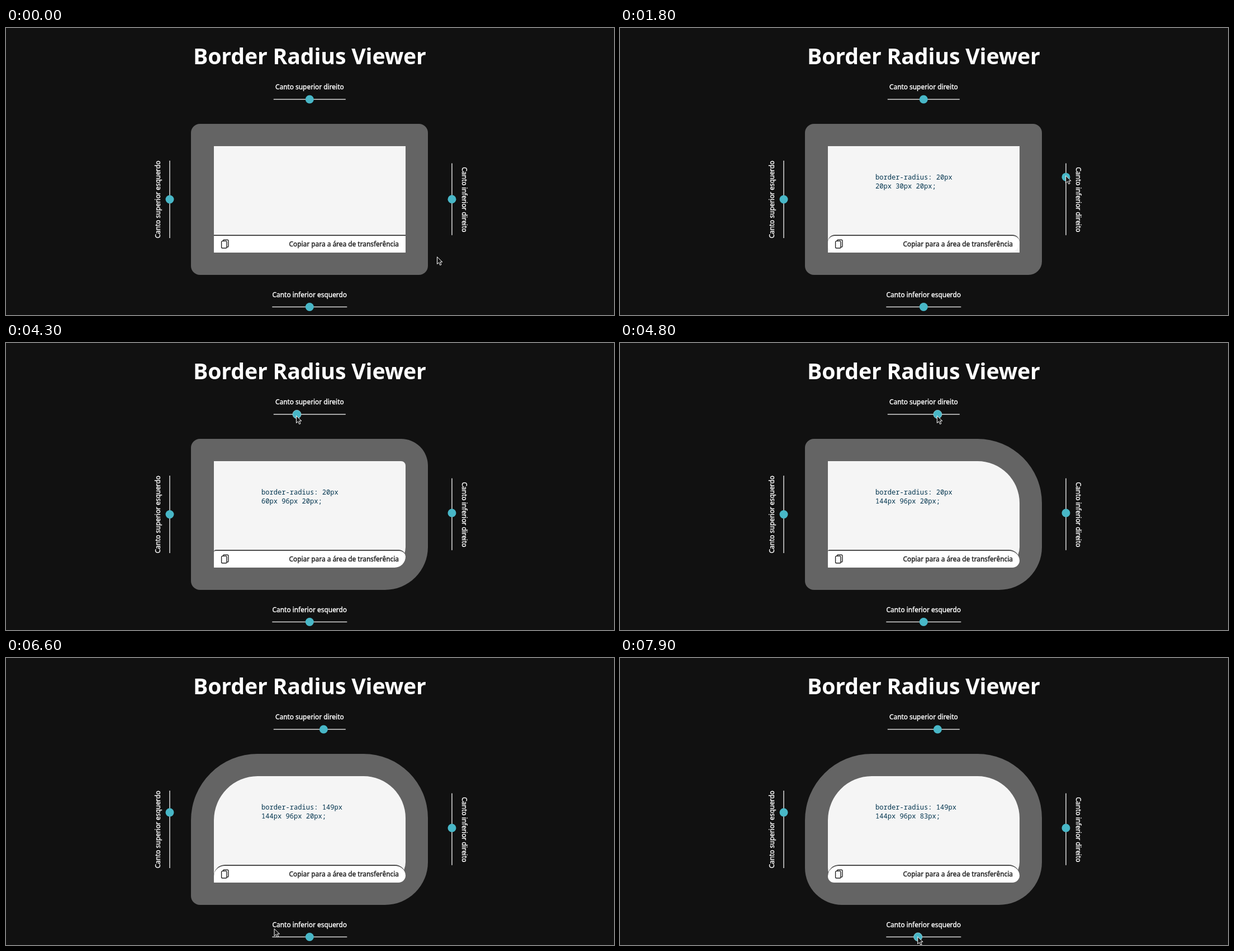
These frames come from a looping animation (1088 by 515 pixels, 8 s). An HTML page:

```html
<!DOCTYPE html>
<html lang="pt">
<head>
<meta charset="utf-8">
<title>Border Radius Viewer</title>
<style>
  html, body { margin: 0; width: 100%; height: 100%; overflow: hidden; background: #111; }
  #stage { position: relative; width: 1088px; height: 515px; overflow: hidden; }
  #box {
    position: absolute; left: 331px; top: 172px; width: 424px; height: 271px;
    box-sizing: border-box; border: 40px solid #646464; border-left-width: 41px;
    background: #f5f5f5;
  }
  #bar {
    position: absolute; left: 0; right: 0; bottom: 0; height: 32px;
    box-sizing: border-box; border-top: 2px solid #4c4c4c; background: #fff;
  }
  svg { position: absolute; left: 0; top: 0; }
  text { font-family: "Noto Sans", "Open Sans", sans-serif; white-space: pre; }
  .title { font-size: 39.3px; font-weight: 700; letter-spacing: -.2px; }
  .label { font-size: 11.9px; stroke-width: .4px; }
  .code { font: 12.1px "Noto Sans Mono", "DejaVu Sans Mono", monospace; fill: #03354f; }
  .mid { text-anchor: middle; fill: #fff; }
  .mid.label { stroke: #fff; }
  .dark { text-anchor: end; fill: #1c1c1c; stroke: #1c1c1c; }
</style>
</head>
<body>
<div id="stage">
  <div id="box"><div id="bar"></div></div>
  <svg width="1088" height="515" viewBox="0 0 1088 515">
    <text class="title mid" x="543.4" y="65">Border Radius Viewer</text>
    <text class="label mid" x="543.3" y="110.3">Canto superior direito</text>
    <text class="label mid" x="543.3" y="482.8">Canto inferior esquerdo</text>
    <text class="label mid" transform="translate(275.8 307.6) rotate(-90)">Canto superior esquerdo</text>
    <text class="label mid" transform="translate(815.9 308) rotate(90)">Canto inferior direito</text>

    <text class="label dark" x="703" y="391.5">Copiar para a área de transferência</text>
    <g fill="none" stroke="#222" stroke-width="1.4">
      <rect x="385.6" y="382.4" width="9.4" height="12.6" rx="1.8"/>
      <path d="M388.4 382.4v-.6q0-1.6 1.6-1.6h6.4q1.6 0 1.6 1.6v9.6q0 1.6-1.6 1.6h-1.4"/>
    </g>
    <text class="code" id="line1" x="457" y="271.6"></text>
    <text class="code" id="line2" x="457" y="287.6"></text>

    <g id="sliders"></g>
    <path id="cursor" d="M.5.7V13.6L3.6 10.8 5.7 15.6 8 14.6 5.9 9.9H9.9Z" fill="#181818" stroke="#fff"/>
  </svg>
</div>
<script>
const LOOP = 8000, STEP = 100, ZOOM = 0.8, MIDDLE = 100;
const $ = id => document.getElementById(id);

// drag: [ms, value] turning points; grip: pointer tip relative to the thumb.
const topLeft = { x: 293, y: 307.5, length: 139, dx: 0, dy: -1,
  arrive: 5700, grip: [-1.5, -7], drag: [[5900, 104], [6300, 149]] };
const topRight = { x: 543.3, y: 128, length: 129, dx: 1, dy: 0,
  arrive: 3700, grip: [-1.5, 2], drag: [[4200, 82], [4300, 60], [4800, 144]] };
const bottomRight = { x: 798, y: 307.3, length: 129, dx: 0, dy: 1,
  arrive: 1100, grip: [-1.5, -3], drift: 12,
  drag: [[1400, 99], [1800, 30], [2000, 22], [2400, 45], [2800, 45], [3100, 96]] };
const bottomLeft = { x: 543.3, y: 500.5, length: 134, dx: 1, dy: 0,
  arrive: 6900, grip: [-1, -1], drag: [[7000, 98], [7300, 72], [7900, 83]] };

const corners = [topLeft, topRight, bottomRight, bottomLeft];
const visits = [bottomRight, topRight, topLeft, bottomLeft];

const mix = (a, b, k) => a + (b - a) * k;
const clamp = k => Math.min(1, Math.max(0, k));
const smooth = k => (1 - Math.cos(Math.PI * k)) / 2;
const easeOut = (k, power) => 1 - (1 - k) ** power;

for (const c of corners) {
  c.start = c.drag[0][0];
  c.end = c.drag.at(-1)[0];
}

function valueAt(c, t) {
  if (t < c.start) return MIDDLE;
  const next = c.drag.findIndex(p => p[0] > t);
  if (next < 0) return c.drag.at(-1)[1];
  const [t0, v0] = c.drag[next - 1], [t1, v1] = c.drag[next];
  return Math.round(mix(v0, v1, smooth((t - t0) / (t1 - t0))));
}

function thumbAt(c, t) {
  const offset = (valueAt(c, t) - MIDDLE) * (c.length - 15) / 200;
  return [c.x + c.dx * offset, c.y + c.dy * offset];
}

function gripAt(c, t) {
  const [x, y] = thumbAt(c, t);
  const k = clamp((t - c.start) / (c.end - c.start));
  return [x + c.grip[0] + (c.drift || 0) * k * k, y + c.grip[1]];
}

function pointerAt(t) {
  let leave = 400, from = [mix(771, 795, clamp(t / 200)), mix(410, 416, clamp(t / 200))];
  for (const c of visits) {
    if (t < c.arrive) {
      const k = clamp((t - leave) / (c.arrive - leave));
      const to = gripAt(c, c.arrive);
      return [mix(from[0], to[0], easeOut(k, 2)), mix(from[1], to[1], easeOut(k, 4))];
    }
    if (t <= c.end) return gripAt(c, t);
    leave = c.end;
    from = gripAt(c, c.end);
  }
  return from;
}

function add(name, attrs) {
  const el = document.createElementNS("http://www.w3.org/2000/svg", name);
  for (const key in attrs) el.setAttribute(key, attrs[key]);
  return $("sliders").appendChild(el);
}

for (const c of corners) {
  const hx = c.dx * c.length / 2, hy = c.dy * c.length / 2;
  add("line", {
    x1: c.x - hx, y1: c.y - hy, x2: c.x + hx, y2: c.y + hy,
    stroke: c.dx ? "#d8d8d8" : "#a8a8a8", "stroke-width": c.dx ? 1.6 : 2,
  });
  c.thumb = add("circle", { r: 7.5, fill: "#48b7c7", "stroke-width": 0.8 });
}

function draw(t) {
  const started = t >= bottomRight.start;
  const radii = corners.map(c => {
    const moved = t >= c.start;
    const [x, y] = thumbAt(c, t);
    c.thumb.setAttribute("cx", x);
    c.thumb.setAttribute("cy", y);
    c.thumb.setAttribute("stroke", c.dx && moved && t <= c.end ? "#a5dbe3" : "none");
    return moved ? valueAt(c, t) : 20;
  });

  const css = radii.map(r => r * ZOOM + "px").join(" ");
  $("box").style.borderRadius = css;
  $("bar").style.borderRadius = started ? css : "0";

  const [first, ...rest] = radii.map(r => r + "px");
  $("line1").textContent = started ? `border-radius: ${first}` : "";
  $("line2").textContent = started ? rest.join(" ") + ";" : "";

  $("cursor").setAttribute("transform", `translate(${pointerAt(t)})`);
}

function tick() {
  const t = performance.now() % LOOP;
  draw(Math.floor(t / STEP) * STEP);
  requestAnimationFrame(tick);
}
tick();
</script>
</body>
</html>
```
